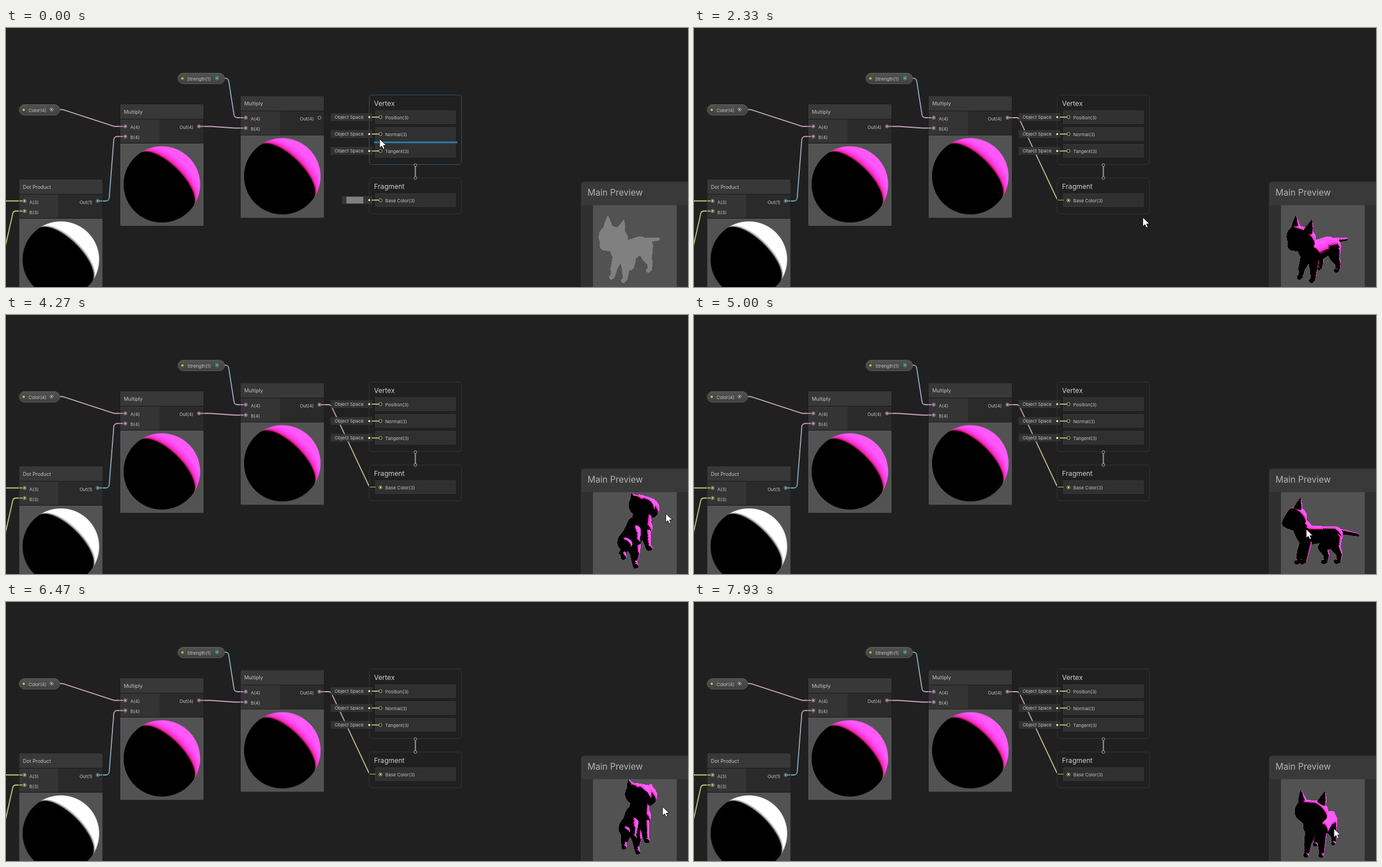
Recreate the animation shown at these times as an HTML page with a canvas. Size 1212 by 462 pixels, loop 8000 ms.

```html
<!DOCTYPE html>
<html lang="en">
<head>
<meta charset="utf-8">
<title>Shader graph</title>
<style>
html, body { margin: 0; width: 100%; height: 100%; overflow: hidden; background: #202020; }
canvas { display: block; }
</style>
</head>
<body>
<canvas id="stage" width="1212" height="462"></canvas>
<script>
const ctx = document.getElementById('stage').getContext('2d');
const LOOP = 8000, STEP = 200 / 3;
const PINK = '#fbcbf4', CYAN = '#84e4e7', YELLOW = '#f0f59a';
const PINK_LINE = '#c4a0bf', CYAN_LINE = '#6fb3b7', YELLOW_LINE = '#c2c77c';
const CONNECTED = 1930, DRAG_EDGE = 800, DRAG_VIEW = 2700;

// Cursor path: time, x, y
const PATH = [
  [0, 664, 198], [390, 557, 161], [800, 557, 161], [1465, 657, 307], [2120, 657, 307],
  [2700, 1116, 408], [2930, 1110, 384], [3130, 1124, 374], [3500, 1198, 353],
  [3900, 1118, 373], [4270, 1173, 354], [4450, 1197, 351], [5000, 1088, 382],
  [5330, 1118, 405], [5700, 1116, 404], [6130, 1142, 376], [6470, 1167, 365],
  [6950, 1198, 353], [7330, 1183, 372], [7700, 1126, 400], [7930, 1137, 404], [8000, 1139, 404]
];

const slope = (i, c) => (PATH[i + 1][c] - PATH[i][c]) / (PATH[i + 1][0] - PATH[i][0]);

// Monotone tangent: flat at turning points and holds
function tangent(i, c) {
  if (i === 0 || i === PATH.length - 1) return 0;
  const a = slope(i - 1, c), b = slope(i, c);
  return a * b <= 0 ? 0 : 2 * a * b / (a + b);
}

function cursorAt(t) {
  let i = 0;
  while (i < PATH.length - 2 && t >= PATH[i + 1][0]) i++;
  const h = PATH[i + 1][0] - PATH[i][0], u = (t - PATH[i][0]) / h;
  const along = c => {
    const a = PATH[i][c], b = PATH[i + 1][c], u2 = u * u, u3 = u2 * u;
    return a * (2 * u3 - 3 * u2 + 1) + b * (3 * u2 - 2 * u3)
      + h * (tangent(i, c) * (u3 - 2 * u2 + u) + tangent(i + 1, c) * (u3 - u2));
  };
  return { x: along(1), y: along(2) };
}

// ---- Shading ----
const lit = (x, y, z) => Math.max(0, 0.64 * x + 0.64 * y - 0.425 * z - 0.15);
const ramp = v => Math.min(1, Math.sqrt(v));
const magenta = s => [255 * ramp(s * 14), 90 * ramp(s * 3), 248 * ramp(s * 6)];
const white = s => Array(3).fill(255 * ramp(s * 11));

function surface(w, h) {
  const c = document.createElement('canvas');
  c.width = w; c.height = h;
  const g = c.getContext('2d');
  return { c, g, img: g.createImageData(w, h) };
}

function makeSphere(color) {
  const size = 148, r = 68, s = surface(size, size), d = s.img.data;
  for (let j = 0; j < size; j++) for (let i = 0; i < size; i++) {
    const x = (i + 0.5 - 74) / r, y = (73.5 - j) / r, q = Math.hypot(x, y);
    const cover = Math.min(1, Math.max(0, (1 - q) * r + 0.5));
    if (!cover) continue;
    const k = q > 1 ? 1 / q : 1, z = Math.sqrt(Math.max(0, 1 - q * q));
    d.set([...color(lit(x * k, y * k, z)), 255 * cover], (j * size + i) * 4);
  }
  s.g.putImageData(s.img, 0, 0);
  return s.c;
}
const pinkBall = makeSphere(magenta), whiteBall = makeSphere(white);

// ---- Cat: chains of balls, each [forward, up, side, radius] ----
const bones = [
  [[45, 28, -9, 18], [45, 28, 9, 18]],
  [[50, 24, 0, 17], [62, 19, 0, 8]],
  [[40, 18, 0, 15], [27, -1, 0, 18]],
  [[-33, 6, 0, 5], [-48, 4, 0, 4], [-66, 1, 0, 3]]
];
for (const s of [-1, 1]) {
  const f = 38 - 4 * s, b = -16 - 9 * s;
  bones.push(
    [[26, -2, s * 5, 17], [0, 0, s * 5, 14], [-22, -1, s * 6, 15]],
    [[43, 40, s * 15, 8], [41, 49, s * 18, 5], [39, 59, s * 20, 1]],
    [[27, -10, s * 9, 10], [f - 5, -32, s * 11, 6], [f - 3, -47, s * 12, 4], [f + 1, -49, s * 12, 4]],
    [[-21, -6, s * 8, 14], [b + 3, -22, s * 12, 9], [b - 4, -36, s * 14, 5], [b - 2, -47, s * 15, 4], [b + 2, -48, s * 15, 4]]
  );
}
const balls = [];
for (const bone of bones) for (let i = 0; i + 1 < bone.length; i++) {
  const a = bone[i], b = bone[i + 1], n = Math.ceil(Math.hypot(b[0] - a[0], b[1] - a[1], b[2] - a[2]) / 1.5);
  for (let k = 0; k <= n; k++) balls.push(a.map((v, j) => v + (b[j] - v) * k / n));
}

const VIEW = { x: 1043, y: 316, w: 149, h: 146 };
const catView = surface(VIEW.w, VIEW.h);
const depth = new Float32Array(VIEW.w * VIEW.h);

function drawCat(px, py, shaded) {
  const yaw = (69 + (px - 1137) * 1.25) * Math.PI / 180;
  const pitch = (16 + (py - 404) * 1.1) * Math.PI / 180;
  const cy = Math.cos(yaw), sy = Math.sin(yaw), cp = Math.cos(pitch), sp = Math.sin(pitch);
  const d = catView.img.data;
  d.fill(0);
  depth.fill(-1e4);
  for (const [f, u, s, rad] of balls) {
    const z0 = f * sy + s * cy, z = u * sp + z0 * cp, k = 400 / (400 - z);
    const x = 1115 - VIEW.x + (s * sy - f * cy) * k, y = 391 - VIEW.y - (u * cp - z0 * sp) * k, r = rad * k;
    const x1 = Math.min(VIEW.w - 1, x + r), y1 = Math.min(VIEW.h - 1, y + r);
    for (let j = Math.max(0, Math.ceil(y - r)); j <= y1; j++) {
      for (let i = Math.max(0, Math.ceil(x - r)); i <= x1; i++) {
        const nx = (i - x) / r, ny = (y - j) / r, q = 1 - nx * nx - ny * ny;
        if (q < 0) continue;
        const nz = Math.sqrt(q), at = j * VIEW.w + i;
        if (z + nz * rad < depth[at]) continue;
        depth[at] = z + nz * rad;
        const c = shaded ? magenta(lit(nx, ny, nz)) : [128, 128, 128];
        d[at * 4] = c[0]; d[at * 4 + 1] = c[1]; d[at * 4 + 2] = c[2]; d[at * 4 + 3] = 255;
      }
    }
  }
  catView.g.putImageData(catView.img, 0, 0);
  ctx.drawImage(catView.c, VIEW.x, VIEW.y);
}

// ---- Drawing helpers ----
function rect(x, y, w, h, fill) {
  ctx.fillStyle = fill;
  ctx.fillRect(x, y, w, h);
}
function round(x, y, w, h, r, fill, stroke) {
  ctx.beginPath();
  ctx.roundRect(x + 0.5, y + 0.5, w - 1, h - 1, r);
  if (fill) { ctx.fillStyle = fill; ctx.fill(); }
  if (stroke) { ctx.strokeStyle = stroke; ctx.lineWidth = 1; ctx.stroke(); }
}
function text(s, x, y, size, color = '#c4c4c4', align = 'left') {
  ctx.font = size + 'px Inter, sans-serif';
  ctx.textAlign = align;
  ctx.textBaseline = 'middle';
  ctx.fillStyle = color;
  ctx.fillText(s, x, y);
}
function dot(x, y, r, fill) {
  ctx.beginPath();
  ctx.arc(x, y, r, 0, 7);
  ctx.fillStyle = fill;
  ctx.fill();
}
function port(x, y, color, filled = true, dim = false) {
  if (dim) return dot(x, y, 1.6, '#777');
  dot(x, y, 2.8, '#1a1a1a');
  ctx.globalAlpha = 0.8;
  ctx.strokeStyle = color;
  ctx.lineWidth = 0.9;
  ctx.stroke();
  ctx.globalAlpha = 1;
  if (filled) dot(x, y, 1.4, color);
}
function edge(x0, y0, x1, y1, from, to, alpha = 1) {
  const grad = ctx.createLinearGradient(x0, y0, x1, y1);
  grad.addColorStop(0, from);
  grad.addColorStop(1, to);
  ctx.globalAlpha = alpha;
  ctx.strokeStyle = grad;
  ctx.lineWidth = 1.8;
  ctx.beginPath();
  ctx.moveTo(x0, y0);
  ctx.arcTo(x0 + 20, y0, x1 - 20, y1, 6);
  ctx.arcTo(x1 - 20, y1, x1, y1, 6);
  ctx.lineTo(x1, y1);
  ctx.stroke();
  ctx.globalAlpha = 1;
}

function node(x, y, title, inputs, output, ball, hover) {
  rect(x - 0.5, y - 0.5, 149, 218, '#191919');
  rect(x, y, 148, 26, '#383838');
  rect(x, y + 27, 70, 42, '#343434');
  rect(x + 70, y + 27, 78, 42, '#2a2a2a');
  rect(x, y + 70, 148, 147, '#525252');
  ctx.drawImage(ball, x, y + 69);
  text(title, x + 6.5, y + 14, 8.9);
  inputs.forEach((s, i) => text(s, x + 18, y + 41.3 + i * 18, 8.1));
  text(output, x + 130, y + 41.3, 8.1, '#c4c4c4', 'right');
  if (hover) round(x - 2, y - 2, 152, 221, 4, null, '#3b7399');
}

function pill(x, y, w, label) {
  const g = ctx.createLinearGradient(0, y, 0, y + 20);
  g.addColorStop(0, '#525252');
  g.addColorStop(1, '#404040');
  round(x, y, w, 20, 9.5, g, '#5a5a5a');
  dot(x + 8.5, y + 10, 2, '#9be25a');
  text(label, x + 17, y + 11.3, 8.1);
}

function slot(y, label) {
  round(656, y, 143, 24, 0, '#303030', '#383838');
  text(label, 674, y + 13.8, 8.1);
}
function stub(y) {
  dot(645.5, y, 1.8, YELLOW);
  rect(650, y - 0.9, 13, 1.8, YELLOW_LINE);
}
function block(y, h, title, hover) {
  round(645, y, 165, h, 5, 'rgba(32,32,32,.85)', hover ? '#2d5470' : '#343434');
  text(title, 654, y + 16, 12.1, '#cfcfcf');
}

function arrow({ x, y }) {
  ctx.beginPath();
  [[0, 0], [0, 16], [3.8, 12.6], [6.3, 18.2], [9, 17], [6.6, 11.6], [11.8, 11.4]]
    .forEach(([i, j]) => ctx.lineTo(x + i, y + j));
  ctx.closePath();
  ctx.fillStyle = '#fff';
  ctx.strokeStyle = '#111';
  ctx.lineWidth = 1;
  ctx.fill();
  ctx.stroke();
}

function draw(t) {
  const cur = cursorAt(t);
  const dragging = t >= DRAG_EDGE && t < CONNECTED;
  const connected = t >= CONNECTED;
  const over = (x, y, w, h) => !dragging && cur.x >= x && cur.x <= x + w && cur.y >= y && cur.y <= y + h;

  rect(0, 0, 1212, 462, '#202020');

  edge(81, 145.5, 212, 175.5, PINK_LINE, PINK_LINE);
  edge(375, 89.5, 426, 160, CYAN_LINE, PINK_LINE);
  edge(163, 308.5, 212, 193.5, CYAN_LINE, PINK_LINE);
  edge(343, 175.5, 426, 178.5, PINK_LINE, PINK_LINE);
  edge(-40, 308.5, 33, 308.5, YELLOW_LINE, YELLOW_LINE);
  edge(-28, 420, 33, 326.5, YELLOW_LINE, YELLOW_LINE);
  if (connected) edge(557, 160, 666, 307, PINK_LINE, YELLOW_LINE);

  pill(23, 136, 73, 'Color(4)');
  pill(305, 80, 84, 'Strength(1)');
  node(23.5, 270, 'Dot Product', ['A(3)', 'B(3)'], 'Out(1)', whiteBall);
  node(203, 136, 'Multiply', ['A(4)', 'B(4)'], 'Out(4)', pinkBall);
  node(417, 121.5, 'Multiply', ['A(4)', 'B(4)'], 'Out(4)', pinkBall, over(417, 121, 148, 217));

  // Short leads over the node bodies
  for (const [x, y, c] of [[346, 175.5, PINK_LINE], [166, 308.5, CYAN_LINE], [203, 175.5, PINK_LINE],
    [203, 193.5, PINK_LINE], [417, 160, PINK_LINE], [417, 178.5, PINK_LINE],
    [24, 308.5, YELLOW_LINE], [24, 326.5, YELLOW_LINE]]) rect(x, y - 0.9, 5, 1.8, c);

  port(81, 145.5, PINK, true, dragging);
  port(375, 89.5, CYAN, true, dragging);
  port(163, 308.5, CYAN, true, dragging);
  port(343, 175.5, PINK, true, dragging);
  port(426, 160, PINK, true, dragging);
  port(426, 178.5, PINK, true, dragging);
  port(557, 160, PINK, connected, dragging);
  port(212, 175.5, PINK);
  port(212, 193.5, PINK);
  port(33, 308.5, YELLOW);
  port(33, 326.5, YELLOW);
  if (connected) rect(560, 159.1, 5, 1.8, PINK_LINE);

  block(119, 125, 'Vertex', over(645, 119, 165, 125));
  ['Position(3)', 'Normal(3)', 'Tangent(3)'].forEach((label, i) => {
    const y = 147 + i * 30.2;
    slot(Math.round(y), label);
    rect(577, Math.round(y + 5), 74, 14, 'rgba(54,54,54,.85)');
    text('Object Space', 584, y + 12.3, 8.1);
    stub(y + 12);
    port(665.5, y + 12, YELLOW, false);
  });
  if (t < STEP) {
    rect(654, 202, 148, 4, '#2c5f82');
    for (let x = 655; x < 802; x += 2) rect(x, 203, 1, 2, '#4a8db8');
  }

  block(267, 65, 'Fragment', connected && over(645, 267, 165, 65));
  slot(295, 'Base Color(3)');
  if (connected) {
    rect(647, 306.1, 10, 1.8, '#7b7e56');
  } else {
    rect(597, 300, 54, 14, '#343434');
    rect(605, 301, 30, 12, '#808080');
    stub(307);
  }
  port(665.5, 307.5, YELLOW, connected || t >= 1330 && dragging);

  rect(726.5, 246, 2, 20, '#9c9c9c');
  if (!dragging) for (const y of [244.5, 267.5]) {
    dot(727.5, y, 2.5, '#202020');
    ctx.strokeStyle = '#b0b0b0';
    ctx.lineWidth = 1;
    ctx.stroke();
  }

  if (dragging) {
    if (t >= 1330) edge(557, 160, 666, 307, PINK_LINE, YELLOW_LINE, 0.5);
    edge(557, 160, cur.x, cur.y, PINK_LINE, PINK_LINE, 0.65);
  }

  round(1022, 274, 200, 200, 5, '#2f2f2f', '#3a3a3a');
  rect(1023, 276, 189, 40, '#393939');
  text('Main Preview', 1033.5, 294.5, 15.5, '#b4b4b4');
  rect(VIEW.x, VIEW.y, VIEW.w, VIEW.h, '#525252');
  const pose = t < DRAG_VIEW ? { x: 1116, y: 408 } : cur;
  drawCat(pose.x, pose.y, connected);

  arrow(cur);
}

let shown = -1;
const start = performance.now();
function tick() {
  const t = (performance.now() - start) % LOOP;
  const k = Math.floor((t + 4) / STEP) % (LOOP / STEP);
  if (k !== shown) draw((shown = k) * STEP);
  requestAnimationFrame(tick);
}
tick();
</script>
</body>
</html>
```
